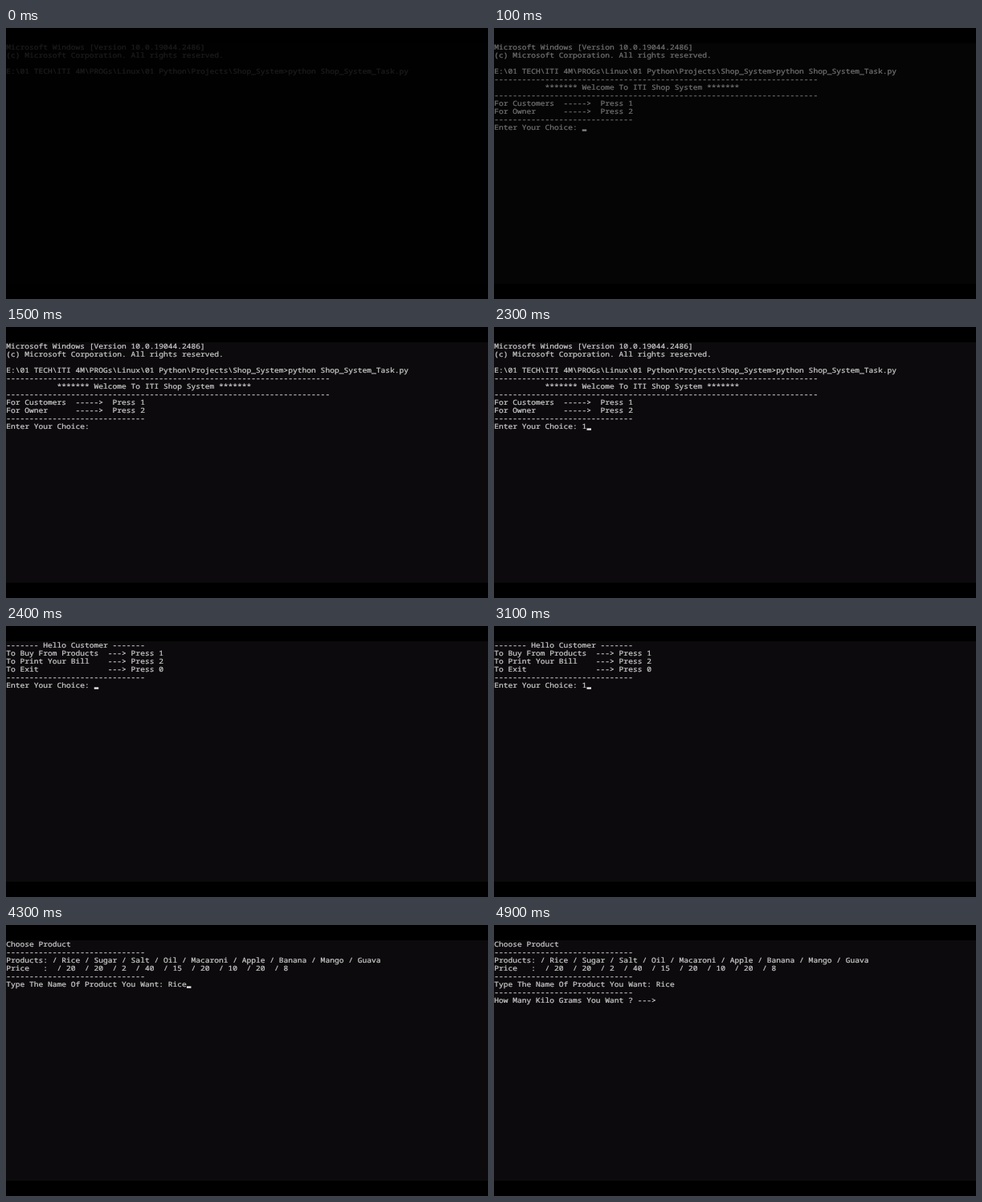
Write an HTML page that moves like this. It is 600 by 338 pixels and loops after 5 s.

```html
<!DOCTYPE html>
<html lang="en">
<head>
<meta charset="utf-8">
<title>Shop console</title>
<style>
  html, body { margin: 0; width: 100%; height: 100%; overflow: hidden; background: #000; }
  svg { display: block; width: 600px; height: 338px; }
  text {
    font: 9.6px "Noto Sans Mono", "DejaVu Sans Mono", monospace;
    white-space: pre;
    text-rendering: geometricPrecision;
  }
</style>
</head>
<body>
<svg viewBox="0 0 600 338">
  <g id="screen">
    <rect y="19" width="600" height="300" fill="#0c0a0c"/>
    <!-- the recorded console is slightly flattened -->
    <g id="lines" transform="translate(.2 19) scale(1 .9)" fill="#ccc" stroke="#ccc" stroke-width=".25"></g>
    <rect id="caret" width="5.5" height="2.3" fill="#eee"/>
  </g>
</svg>
<script>
const LOOP = 5000, TOP = 19, ROW = 10, COL = 5.76, SQUASH = .9;
const dash = n => "-".repeat(n);

const shell = [
  "Microsoft Windows [Version 10.0.19044.2486]",
  "(c) Microsoft Corporation. All rights reserved.",
  "",
  String.raw`E:\01 TECH\ITI 4M\PROGs\Linux\01 Python\Projects\Shop_System>python Shop_System_Task.py`
];
const welcome = [
  ...shell,
  dash(70),
  "           ******* Welcome To ITI Shop System *******",
  dash(70),
  "For Customers  ----->  Press 1",
  "For Owner      ----->  Press 2",
  dash(30),
  "Enter Your Choice: "
];
const customer = [
  "------- Hello Customer -------",
  "To Buy From Products  ---> Press 1",
  "To Print Your Bill    ---> Press 2",
  "To Exit               ---> Press 0",
  dash(30),
  "Enter Your Choice: "
];
const products = [
  "Choose Product",
  dash(30),
  "Products: / Rice / Sugar / Salt / Oil / Macaroni / Apple / Banana / Mango / Guava",
  "Price   :  / 20  / 20  / 2  / 40  / 15  / 20  / 10  / 20  / 8",
  dash(30),
  "Type The Name Of Product You Want: "
];
const amount = [
  ...products.slice(0, -1),
  products.at(-1) + "Rice",
  dash(30),
  "How Many Kilo Grams You Want ? ---> "
];

// [start ms, page, typed text]
const pages = [
  [0, shell, ""], [100, welcome, ""], [2200, welcome, "1"],
  [2400, customer, ""], [3100, customer, "1"],
  [3200, products, ""], [4000, products, "R"], [4100, products, "Ri"],
  [4200, products, "Ric"], [4300, products, "Rice"],
  [4600, amount, ""]
];
// Caret toggles at each time, starting hidden
const blinks = [100, 300, 400, 600, 800, 1000, 1300, 1500, 1700, 1900, 2100,
  2700, 2900, 3500, 3600, 3800, 4000, 4500, 4700, 4900];
// [start ms, opacity]
const fade = [[0, .13], [100, .55], [200, 1]];

const $ = id => document.getElementById(id);
const stage = $("screen"), lines = $("lines"), caret = $("caret");
const rows = Array.from({ length: welcome.length }, (_, i) => {
  const row = document.createElementNS(lines.namespaceURI, "text");
  row.setAttribute("y", (i * ROW + 8.2) / SQUASH);
  return lines.appendChild(row);
});
const at = (steps, t) => steps.findLast(s => s[0] <= t);

let shown;
function show(step) {
  if (step === shown) return;
  shown = step;
  const [, page, typed] = step, last = page.length - 1;
  rows.forEach((row, i) => {
    row.textContent = (page[i] ?? "") + (i === last ? typed : "");
  });
  caret.setAttribute("x", (page[last] + typed).length * COL + .3);
  caret.setAttribute("y", TOP + last * ROW + 7.4);
}

function frame() {
  const t = performance.now() % LOOP;
  show(at(pages, t));
  stage.setAttribute("opacity", at(fade, t)[1]);
  const on = blinks.filter(b => b <= t).length % 2;
  caret.setAttribute("visibility", on ? "visible" : "hidden");
  requestAnimationFrame(frame);
}
frame();
</script>
</body>
</html>
```
